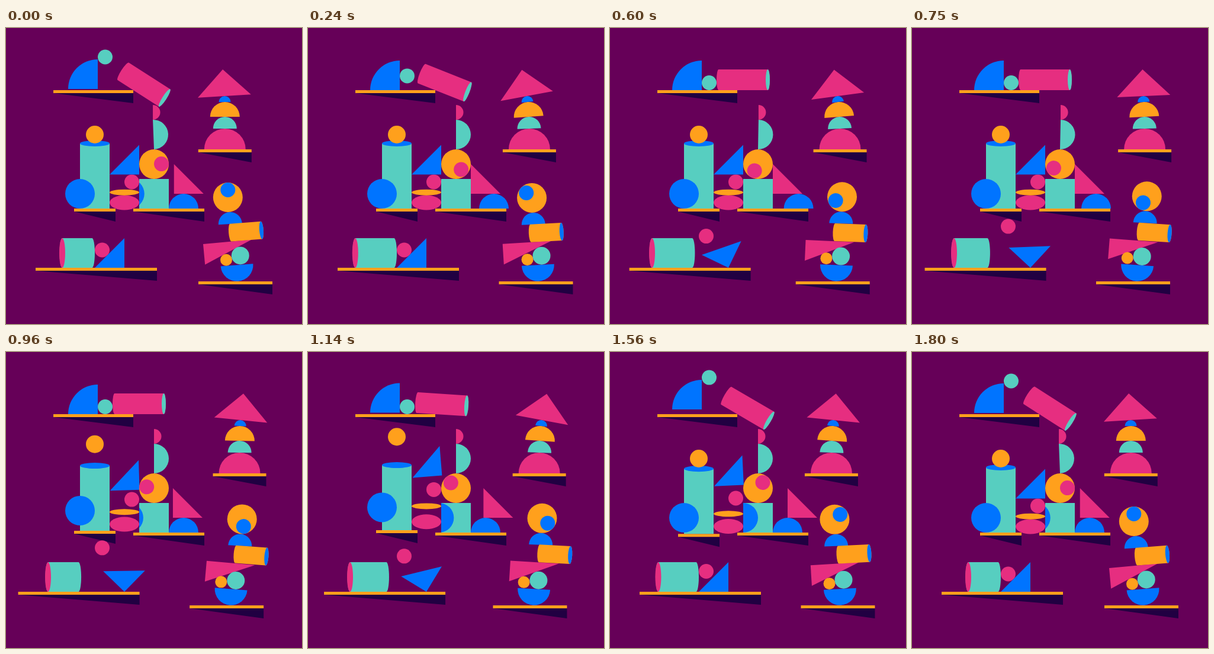
An HTML page with a canvas that plays this animation: 500 px wide and 500 px high, repeating every 1830 ms.

```html
<!DOCTYPE html>
<html>
<head>
<meta charset="utf-8">
<style>
html, body { margin: 0; width: 100%; height: 100%; overflow: hidden; background: #660058; }
canvas { display: block; }
</style>
</head>
<body>
<canvas id="stage" width="500" height="500"></canvas>
<script>
const g = document.getElementById('stage').getContext('2d');
const BG = '#660058', PINK = '#e62e80', BLUE = '#0074ff', TEAL = '#57cec0',
      ORANGE = '#ffa01c', SHADE = '#210042';
const PERIOD = 1800, LOOP = 1830, STEP = 30, RAD = Math.PI / 180;
let t = 0;

// Progress 0..1 between times a and b, which may run past the loop's end
const span = (a, b) => Math.min(1, (t - a + PERIOD) % PERIOD / (b - a));
// Parabolic jump of height h
function hop(a, b, h) {
  const u = span(a, b);
  return 4 * h * u * (1 - u);
}
// Half a sine wave of height h; a larger power softens its ends
const wave = (a, b, h, power = 1) =>
  h * Math.max(0, Math.sin(Math.PI * span(a, b))) ** power;
// Eased rise, long rest and eased fall
function swell(a, b, h) {
  const s = wave(a, b, 1);
  return h * s * s * (3 - 2 * s);
}

// Swing over the whole loop
const phase = () => t * 360 / PERIOD;
const sin = (deg = 0) => Math.sin((phase() + deg) * RAD);
const cos = () => Math.cos(phase() * RAD);
const sway = (mid, a, b = 0, c = 0) => mid + a * cos() + b * sin() + c * cos() ** 2;

function fill(color, path) {
  g.fillStyle = color;
  g.beginPath();
  path();
  g.fill();
}
function at(x, y, deg, draw) {
  g.save();
  g.translate(x, y);
  g.rotate(deg * RAD);
  draw();
  g.restore();
}
const poly = (color, ...p) => fill(color, () => {
  for (let i = 0; i < p.length; i += 2) g.lineTo(p[i], p[i + 1]);
});
const box = (color, x, y, w, h) => fill(color, () => g.rect(x, y, w, h));
const oval = (color, x, y, rx, ry = rx) =>
  fill(color, () => g.ellipse(x, y, rx, ry, 0, 0, 2 * Math.PI));
const dome = (color, x, y, r, deg = 0) =>
  at(x, y, deg, () => fill(color, () => g.arc(0, 0, r, Math.PI, 2 * Math.PI)));
const tube = (color, x1, x2, y, rx, ry) => fill(color, () => {
  g.ellipse(x1, y, rx, ry, 0, Math.PI / 2, Math.PI * 1.5);
  g.ellipse(x2, y, rx, ry, 0, -Math.PI / 2, Math.PI / 2);
});
function shelf(x, y, w) {
  poly(SHADE, x, y + 5, x + w, y + 5, x + w, y + 22);
  box(ORANGE, x, y, w, 5);
}
// Disc with a smaller disc rolling inside it
function eye(x, y, color, deg) {
  oval(ORANGE, x, y, 25);
  at(x, y, deg, () => oval(color, 12.5, 0, 12.5));
}

function topLeft() {
  shelf(80, 105, 135);
  const y = 105 - hop(1080, 1850, 8.6);
  fill(BLUE, () => {
    g.moveTo(155, y);
    g.arc(155, y, 50, Math.PI, Math.PI * 1.5);
  });
  oval(TEAL, 167.5, 92.5 - hop(1152, 2098, 50.4), 12.5);
  at(215, 105, wave(1050, 2390, 33.5, 1.4), () => {
    tube(PINK, -31.5, 51.5, -17.5, 3.5, 17.5);
    oval(TEAL, 51.5, -17.5, 3.5, 17.5);
  });
}

function midLeft() {
  const dy = hop(1445, 1700, 2.2) - hop(800, 1445, 4);
  at(0, dy, 0, () => {
    shelf(115, 305, 70);
    box(TEAL, 125, 195, 50, 110);
    oval(BLUE, 150, 195, 25, 5);
  });
  oval(BLUE, 125, 280 - hop(820, 1460, 17.6), 25);
  oval(ORANGE, 150, 180 - hop(812, 1525, 37), 15);
}

function midStack() {
  oval(PINK, 200, 295 - hop(868, 1570, 8.7), 25, 12.5);
  oval(ORANGE, 200, 277.7 - hop(879, 1605, 18.8), 25, 5);
  oval(PINK, 212.5, 260 - hop(885, 1651, 31), 12.5);
  const lift = hop(888, 1680, 42.6);
  at(200 + lift * 0.04, 247.5 - lift, -lift * 0.125, () =>
    poly(BLUE, -25, 0, 25, -50, 25, 0));
}

function midRight() {
  shelf(215, 305, 120);
  box(TEAL, 225, 255, 50, 50);
  // The hidden disc pushes the triangle by the same distance
  const push = Math.min(25, wave(885, 1895, 30));
  g.save();
  g.beginPath();
  g.rect(225, 255, 50, 50);
  g.clip();
  oval(BLUE, 200 + push, 280, 25);
  g.restore();
  dome(BLUE, 300 + hop(62, 880, 20.6), 305, 25);
  at(275 + push, 280, 0, () => poly(PINK, 0, 0, 0, -50, 50, 0));
  eye(250, 230, PINK, phase() - 2);
  const lean = wave(450, 960, 1.3) - wave(1650, 2000, 2.3);
  at(250, 205, lean, () => dome(TEAL, 0, -25, 25, 90));
  dome(PINK, 250 + 50 * Math.sin(lean * RAD), 142.5, 12.5, 90);
}

function bottomLeft() {
  shelf(50 - swell(420, 1373, 29.5), 405, 205);
  const left = 71 + wave(1330, 2250, 24, 2.4);
  const right = 150 - wave(500, 1320, 23.5, 1.3);
  tube(TEAL, left, right - 4.5, 380, 4.5, 25);
  oval(PINK, left, 380, 5, 25);
  oval(PINK, 162.5, 375 - hop(470, 1320, 45.2) - hop(1320, 1640, 6), 12.5);
  at(200, 405, swell(430, 1342, 44.3), () => poly(BLUE, -50, 0, 0, -50, 0, 0));
}

function topRight() {
  const x = 382.3 - 12.5 * cos();
  shelf(x - 45, 205, 90);
  dome(PINK, x, 205, 35);
  dome(TEAL, x - 0.5 * sin(), 170, 20, -3 * sin());
  dome(ORANGE, x - 1.6 * sin(), 150, 25, -5.5 * sin());
  dome(BLUE, x - 4.2 * sin(4), 125, 10, -8 * sin(4));
  at(x - 5.2 * sin(10), 115, -11.5 * sin(18), () => poly(PINK, -45, 0, 0, -45, 45, 0));
}

function bottomRight() {
  shelf(sway(317.5, 7.5), 428, 125);
  at(sway(335.3, -2.3, -6.8), sway(358, 5.8, 3, 1.2), sway(0, -5.2), () =>
    poly(PINK, 0, 0, 82, 0, 0, 35));
  dome(BLUE, sway(385, 5), 400.3, 27.5, sway(180, -4.5));
  oval(ORANGE, sway(367.6, 4.4), sway(390, 1.7), 10);
  oval(TEAL, sway(392, 3.8), sway(385.2, -0.8), 15);
  const y = sway(283.3, 1.5, 2.75, 1.2);
  dome(BLUE, sway(387, -8.2, -0.9), y + 45, 20, sway(0, -3.5));
  at(sway(410, -3.6, -6.5, -0.9), sway(343.2, -0.3, 2.85, 0.7), sway(0, -4.4), () => {
    tube(ORANGE, -26, 26, 0, 3.5, 15);
    oval(BLUE, 26, 0, 3.5, 15);
  });
  eye(sway(386.8, -12, -0.9), y, BLUE, -90 - phase());
}

function frame() {
  t = Math.floor(performance.now() % LOOP / STEP) * STEP % PERIOD;
  box(BG, 0, 0, 500, 500);
  midLeft();
  midStack();
  midRight();
  topLeft();
  bottomLeft();
  topRight();
  bottomRight();
  requestAnimationFrame(frame);
}
frame();
</script>
</body>
</html>
```
